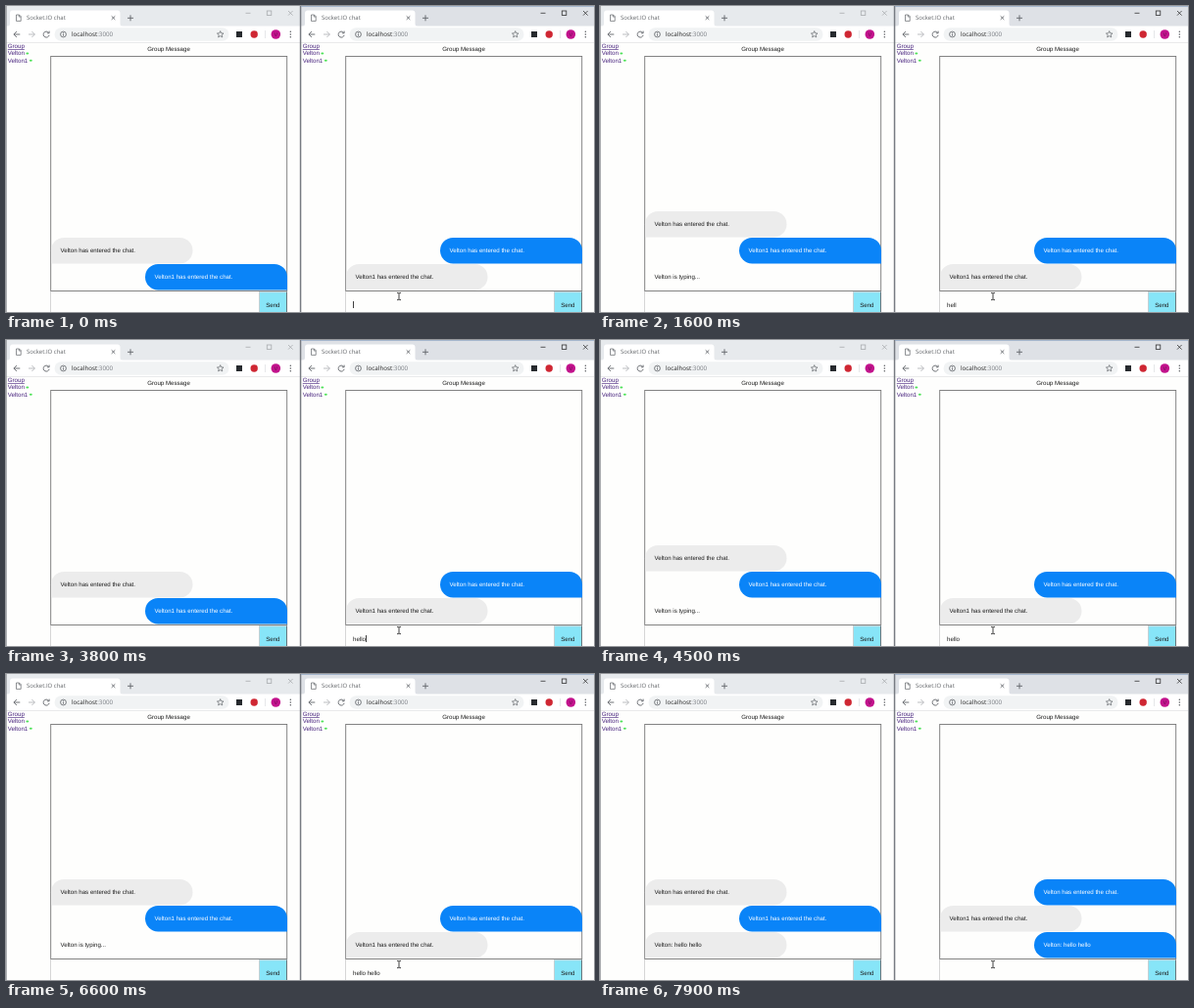
An HTML page that plays this animation: 600x313 px, repeating every 8000 ms.

```html
<!DOCTYPE html>
<html lang="en">
<head>
<meta charset="utf-8">
<title>Chat in two windows</title>
<style>
  html, body { margin: 0; width: 100%; height: 100%; overflow: hidden; background: #fefefd; }
  svg { display: block; width: 600px; height: 313px; }
  text { font: 6.15px "Liberation Sans", Arial, sans-serif; fill: #1c1c1c; white-space: pre; text-rendering: geometricPrecision; }
  .ui { font-family: "Open Sans", "Noto Sans", sans-serif; }
  .line { fill: none; stroke: #5f6368; stroke-width: .9; }
</style>
</head>
<body>
<svg id="stage" viewBox="0 0 600 313"></svg>
<script>
const LOOP = 8000;
const WINDOW_GAP = 301;
const USER = 'Velton', PEER = 'Velton1';
const SENT_AT = 7400;

// [time, field content]
const typing = [
  [0, ''], [600, 'h'], [700, 'he'], [900, 'hel'], [1100, 'hell'], [1700, 'hello'],
  [3900, 'hello '], [5200, 'hello h'], [5400, 'hello he'], [5500, 'hello hel'],
  [5700, 'hello hell'], [5800, 'hello hello'], [6100, 'hello hello '], [SENT_AT, '']
];
const caretFlips = [200, 600, 1600, 1700, 2200, 2700, 3200, 3800, 4400, 4900, 6600, 7100, 7900];
const noticeFlips = [600, 2400, 3900, 4700, 5200, 6900];

const stage = document.getElementById('stage');
const flipsBefore = (flips, t) => flips.filter(at => at <= t).length;
const rect = (x, y, w, h, fill, extra = '') =>
  `<rect x="${x}" y="${y}" width="${w}" height="${h}" fill="${fill}" ${extra}/>`;
const line = (d, extra = '') => `<path class="line" d="${d}" ${extra}/>`;
const text = (x, y, content, extra = '') => `<text x="${x}" y="${y}" ${extra}>${content}</text>`;

function star(cx, cy, outer) {
  const points = Array.from({ length: 10 }, (_, i) => {
    const r = i % 2 ? outer * .45 : outer, a = i * Math.PI / 5 - Math.PI / 2;
    return `${(cx + r * Math.cos(a)).toFixed(2)},${(cy + r * Math.sin(a)).toFixed(2)}`;
  });
  return `<polygon class="line" points="${points.join(' ')}" style="stroke-width:.7"/>`;
}

function tabStrip(active) {
  const ink = active ? '#333' : '#a9abae';
  return rect(0, 0, 300, 21, active ? '#dee1e6' : '#e7eaed')
    + '<path d="M1 21Q4 21 4 18V7.5Q4 4.5 7 4.5H113.500Q116.500 4.500 116.500 7.500V18Q116.500 21 119.500 21Z" fill="#fff"/>'
    + line('M10.500 9h3l1.700 1.700v4.700h-4.700zM13.300 9v2h2', 'style="stroke-width:.7"')
    + text(21, 14.2, 'Socket.IO chat', 'class="ui" style="font-size:6px;fill:#606367"')
    + line('M107.700 10.300l3.600 3.600m0-3.600l-3.600 3.600')
    + line('M124 12.300h6m-3-3v6')
    + `<g style="stroke:${ink};stroke-width:.8;fill:none">
        <path d="M244.500 7.300h5M288 5l4.600 4.600m0-4.600l-4.600 4.600"/>
        <rect x="266.300" y="5" width="4.500" height="4.500"/></g>`;
}

function toolbar() {
  return rect(0, 20.5, 300, 17, '#fff')
    + rect(49.5, 22.3, 178, 13.4, '#f1f3f4', 'rx="6.7"')
    + line('M14.300 29h-6.300m2.900-3l-3 3l3 3')
    + line('M23 29h6.300m-2.900-3l3 3l-3 3', 'style="stroke:#b4b6b9"')
    + line('M43.500 27.200a3 3 0 1 0 .6 2.600M44.100 25.600v2.200h-2.300')
    + '<circle class="line" cx="58.500" cy="29" r="2.900" style="stroke-width:.8"/>'
    + line('M58.500 28.600v2M58.500 27.100v.8')
    + text(67, 31.2, '<tspan fill="#222">localhost</tspan><tspan fill="#777b80">:3000</tspan>',
      'class="ui" style="font-size:6.25px"')
    + star(218.7, 29.1, 3.5)
    + rect(235, 26, 6, 6, '#272a2e')
    + '<circle cx="253.200" cy="29" r="3.700" fill="#cf2733"/>'
    + rect(264, 25, .6, 8, '#d5d7da')
    + '<circle cx="275.300" cy="29" r="4.800" fill="#c2128c"/>'
    + text(275.3, 31, USER[0], 'text-anchor="middle" style="font-size:5.500px;fill:#6d1455"')
    + [26.3, 29, 31.7].map(y => `<circle cx="290.300" cy="${y}" r=".75" fill="#55585c"/>`).join('')
    + rect(0, 37.2, 300, .6, '#dcdee0');
}

function page() {
  const link = 'style="fill:#45207c"';
  return text(1.8, 43.2, 'Group', 'style="fill:#45207c;text-decoration:underline"')
    + text(1.8, 50.4, USER, link)
    + text(1.8, 57.6, PEER, link)
    + '<g fill="#50e35a"><ellipse cx="21.800" cy="48.500" rx="1.500" ry="1"/><ellipse cx="25.300" cy="55.700" rx="1.500" ry="1"/></g>'
    + text(166, 45.6, 'Group Message', 'text-anchor="middle"')
    + '<rect x="45.700" y="51.500" width="241" height="240" fill="none" stroke="#777" stroke-width=".9"/>'
    + rect(45.3, 292, .7, 21, '#c4c4c4')
    + rect(258, 292.4, 29, 21, '#87e5f8')
    + rect(258, 292.4, .9, 21, '#c8cdd0')
    + rect(258, 292.4, 29, .8, '#c8cdd0')
    + rect(286, 292.4, 1, 21, '#68757b')
    + text(272.3, 307.9, 'Send', 'text-anchor="middle"');
}

// Rows count upwards from the bottom of the chat box.
function message(content, row, kind) {
  const y = 264 - row * 27, own = kind === 'own';
  const bubble = own
    ? `<path d="M155.200 ${y}H273.800A13.200 13.200 0 0 1 287 ${y + 13.2}V${y + 26.4}H155.200A13.200 13.200 0 0 1 155.200 ${y}Z" fill="#0a84f8"/>`
    : `<path d="M59.200 ${y}H177.300A13.200 13.200 0 0 1 177.300 ${y + 26.4}H46V${y + 13.2}A13.200 13.200 0 0 1 59.200 ${y}Z" fill="#ececec"/>`;
  return (kind === 'notice' ? '' : bubble)
    + text(own ? 151.5 : 55.5, y + 15.2, content, own ? 'style="fill:#fff"' : '');
}

const chatWindow = (id, x, active) =>
  `<g transform="translate(${x})">${tabStrip(active)}${toolbar()}${page()}<g id="${id}"></g></g>`;

stage.innerHTML = rect(0, 0, 600, 313, '#fefefd')
  + chatWindow('left', 0, false)
  + chatWindow('right', WINDOW_GAP, true)
  + rect(0, 0, .7, 313, '#8d9094')
  + rect(299.8, 0, 1.5, 313, '#777b82')
  + rect(301, 0, 299, .7, '#8fa5c4')
  + text(354, 307.7, '', 'id="field"')
  + rect(0, 302, .8, 7, '#111', 'id="caret"')
  + line('M399 293.400h1.300l.7.600l.7-.600h1.300M401 294v6M399 300.600h1.300l.7-.600l.7.600h1.300', 'style="stroke:#111;stroke-width:.8"');

const [left, right, field, caret] = ['left', 'right', 'field', 'caret'].map(id => document.getElementById(id));
let shown = '';

function draw(t) {
  const content = typing.filter(([at]) => at <= t).pop()[1];
  const caretOn = flipsBefore(caretFlips, t) % 2 === 0;
  const noticeOn = flipsBefore(noticeFlips, t) % 2 === 1;
  const sent = t >= SENT_AT;
  const state = [content, caretOn, noticeOn, sent].join('|');
  if (state === shown) return;
  shown = state;

  const joined = name => `${name} has entered the chat.`;
  const greeting = `${USER}: hello hello`;
  const leftShift = noticeOn || sent ? 1 : 0, rightShift = sent ? 1 : 0;
  left.innerHTML = message(joined(USER), 1 + leftShift, 'other')
    + message(joined(PEER), leftShift, 'own')
    + (noticeOn ? message(`${USER} is typing...`, 0, 'notice') : '')
    + (sent ? message(greeting, 0, 'other') : '');
  right.innerHTML = message(joined(USER), 1 + rightShift, 'own')
    + message(joined(PEER), rightShift, 'other')
    + (sent ? message(greeting, 0, 'own') : '');

  field.textContent = content;
  caret.setAttribute('x', 354.2 + (content ? field.getComputedTextLength() : 0));
  caret.setAttribute('visibility', caretOn ? 'visible' : 'hidden');
}

const start = performance.now();
function tick() {
  draw((performance.now() - start) % LOOP);
  requestAnimationFrame(tick);
}
tick();
</script>
</body>
</html>
```
